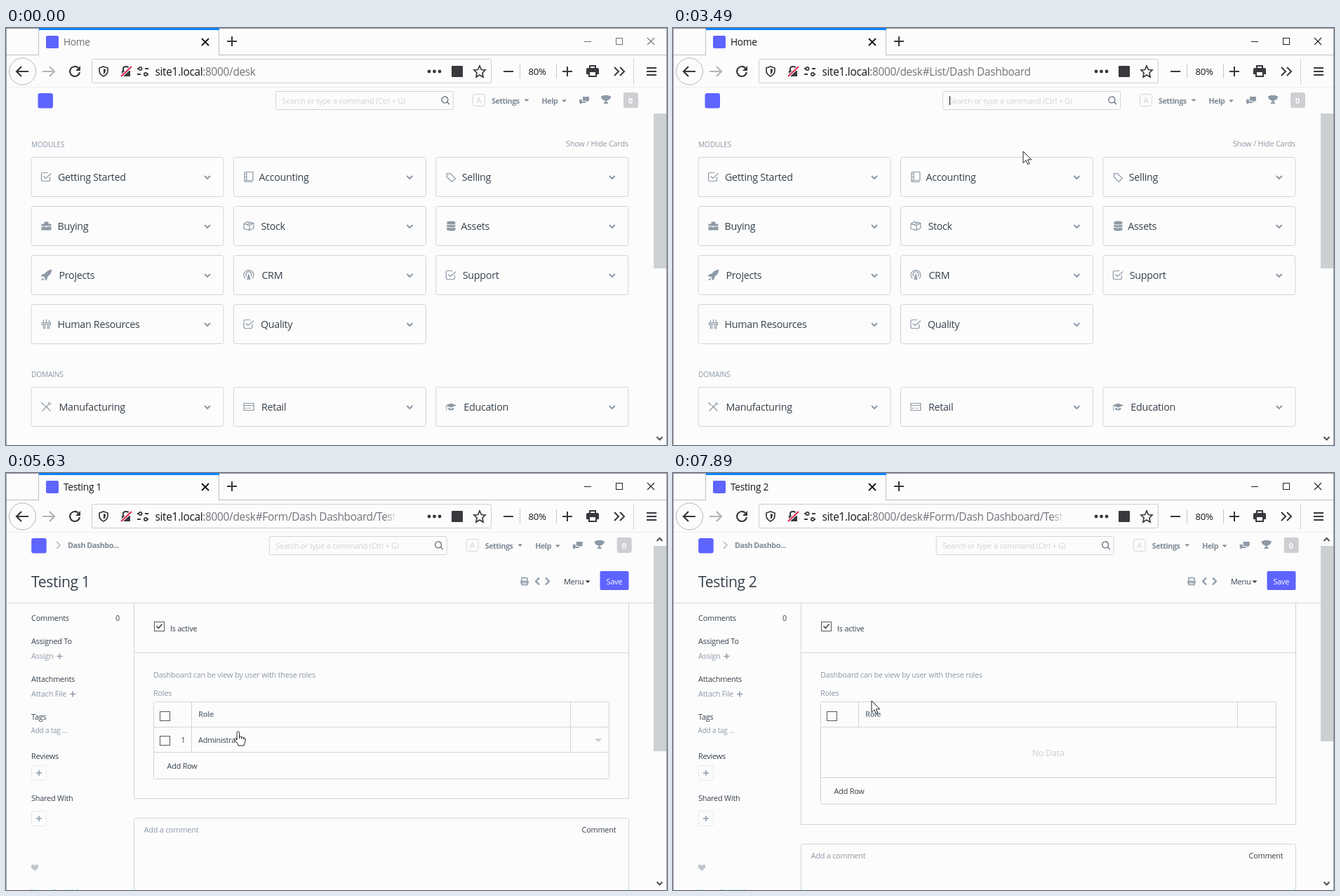
Write an HTML page that moves like this. It is 942x595 px and loops after 8 s.

```html
<!DOCTYPE html>
<html lang="en">
<head>
<meta charset="utf-8">
<title>Desk walkthrough</title>
<style>
html, body { margin: 0; width: 100%; height: 100%; overflow: hidden; background: #fcfcfc; }
svg { display: block; width: 942px; height: 595px; font-family: "Open Sans", "Noto Sans", sans-serif; }
text { white-space: pre; letter-spacing: -.02em; fill: #36414c; }
.m { fill: #8d99a6; }
.l { fill: #ccd2d8; }
.b, .mb { font-weight: 700; letter-spacing: -.04em; }
.mb { fill: #7f8b97; }
.w { fill: #fff; }
.k { fill: #15141a; }
.g { fill: #73737a; }
path, line, rect, circle { fill: none; }
.ln { stroke: #d1d5d9; }
.dim { opacity: .62; }
</style>
</head>
<body>
<svg id="stage" viewBox="0 0 942 595"></svg>
<script>
const INK = '#38383d', GREY = '#8d99a6', BLUE = '#5e64ff', PAGE = '#fcfcfc';
const ICONS = {
  check: 'M5 0V4Q5 6 3 6H-5Q-7 6-7 4V-4Q-7-6-5-6H2M-4-1L-1 2L7-5',
  book: 'M-4-7H6V5H-4Q-6 5-6 6T-4 7H6M-6 6V-5Q-6-7-4-7M-3-7V5M-5-4H-3M-5 0H-3',
  tag: 'M-6-5H-1L6 2L1 7L-6 0ZM-4-3H-3',
  box: 'M-7-3L-2-6L7-4V3L1 6L-7 4ZM-7-3L1-1L7-4M1-1V6M-3-2L4-5',
  tower: 'M0 0V7M-2 7L0-1L2 7M-5 5A7 7 0 1 1 5 5M-3 2A4 4 0 1 1 3 2',
  people: 'M-4-2V7M-2 7V0H2V7M4 7V-2M-6 2V-2H6V2M-4-6V-3M0-7V-2M4-6V-3',
  tools: 'M-6 6L5-5M6 6L-2-2M-7-6L-3-2M4-7V-4H7',
  card: 'M-7-5H7V5H-7ZM-7-2H7M-5 2H-2M0 2H3'
};
const SOLID = {
  bag: 'M-3-3V-6H3V-3H7V0H-7V-3H-1.5V-4.5H1.5V-3ZM-7 1H-1V2H1V1H7V6H-7Z',
  disks: 'M-6-6Q0-8 6-6V-3Q0-1-6-3ZM-6-2Q0 0 6-2V1Q0 3-6 1ZM-6 2Q0 4 6 2V6Q0 8-6 6Z',
  rocket: 'M8-8Q1-7-2-2L-6-1L-8 2L-4 2L-2 4V8L1 6L2 2Q7-1 8-8ZM-5 4L-8 8L-3 6Z',
  cap: 'M-8-2L0-5L8-2L0 1ZM-4 1L0 3L4 1V4Q0 6-4 4ZM-7-1V5H-6V-1Z',
  heart: 'M0 5L-5 0Q-6-4-3-4.500Q-1-4.500 0-2.500Q1-4.500 3-4.500Q6-4 5 0Z',
  chat: 'M-2-5H7V1H5V3L2 1H-2ZM-7-1H-3V2H2V4H-3L-6 6V4H-7Z',
  cup: 'M-4-6H4V-5H7Q7 0 3 1L1 2V4H3V6H-3V4H-1V2L-3 1Q-7 0-7-5H-4Z'
};

const tag = (x, y, body) => `<g transform="translate(${x} ${y})">${body}</g>`;
const text = (x, y, s, cls = '', size = 10.9, extra = '') =>
  `<text x="${x}" y="${y + size * .36}" font-size="${size}" class="${cls}" ${extra}>${s}</text>`;
const stroke = (x, y, d, color = GREY, w = 1.2) =>
  tag(x, y, `<path d="${d}" stroke="${color}" stroke-width="${w}"/>`);
const fill = (x, y, d, color = GREY) => tag(x, y, `<path d="${d}" style="fill:${color}"/>`);
const rect = (x, y, w, h, color, r = 0) =>
  `<rect x="${x}" y="${y}" width="${w}" height="${h}" rx="${r}" style="fill:${color}"/>`;
const frame = (x, y, w, h, r = 2, color = '#d1d5d9', extra = '') =>
  `<rect x="${x}" y="${y}" width="${w}" height="${h}" rx="${r}" stroke="${color}" ${extra}/>`;
const hline = (y, x1, x2, c = '#d1d5d9') => `<path d="M${x1} ${y}H${x2}" stroke="${c}"/>`;
const vline = (x, y1, y2, c = '#d1d5d9') => `<path d="M${x} ${y1}V${y2}" stroke="${c}"/>`;
const icon = (x, y, name) => SOLID[name] ? fill(x, y, SOLID[name]) : stroke(x, y, ICONS[name]);
const caret = (x, y, c = INK) => fill(x, y, 'M-3.500-1.500H3.500L0 2Z', c);
const plus = (x, y, r = 4, c = GREY, w = 1.5) => stroke(x, y, `M${-r} 0H${r}M0 ${-r}V${r}`, c, w);
const chevron = (x, y, up, c = '#505050') => stroke(x, y, up ? 'M-4 2L0-2L4 2' : 'M-4-2L0 2L4-2', c, 2);
const box = (x, y) => frame(x + .5, y + .5, 14, 13, 0, '#55595e');
const dashed = (x, y, s) => frame(x, y, s, s, 2, '#d1d8dd', 'stroke-dasharray="2 2"');
const group = (id, body) => `<g id="${id}">${body}</g>`;
const faint = body => `<g opacity=".55">${body}</g>`;
const lens = (x, y) => stroke(x, y, 'M3 2A4.500 4.500 0 1 0 2 3M2 2L6 6', '#6c7680', 1.4);

function chrome() {
  return rect(0, 0, 942, 85, '#fcfcfd') + hline(.5, 0, 942, '#8f9094') +
    hline(38.5, 0, 47, '#bfc0c4') + hline(38.5, 304, 942, '#bfc0c4') +
    vline(46.5, 1, 39, '#bfc0c4') + vline(303.5, 1, 39, '#bfc0c4') + rect(47, 0, 257, 3, '#0a84ff') +
    rect(57, 11, 18, 18, BLUE, 2) + stroke(284, 20, 'M-5-5L5 5M5-5L-5 5', '#15141a', 1.8) +
    plus(322, 19, 7, INK, 2) +
    group('focus', text(82, 20, 'Home', 'k', 13.7, 'id="title"') +
      stroke(829, 19, 'M-5 .5H5', '#222', 1) + frame(869.5, 14.5, 9, 9, 0, '#222') +
      stroke(919, 19, 'M-5-5L5 5M5-5L-5 5', '#222', 1.1)) +
    `<circle cx="23.500" cy="62" r="19" stroke="#b5b6ba"/>` +
    stroke(23, 62, 'M9 0H-8M-1-7L-8 0L-1 7', INK, 2.2) +
    stroke(61, 62, 'M-9 0H8M1-7L8 0L1 7', '#b4b4b8', 2.2) +
    stroke(98, 62, 'M5-5A7 7 0 1 0 7 1', INK, 2.2) + fill(98, 62, 'M8-8V-1H1Z', INK) +
    frame(122.5, 44.5, 569, 34, 2, '#cdced2') +
    stroke(139, 62, 'M0-7L6-5V-1Q6 4 0 7Q-6 4-6-1V-5Z', INK, 1.7) + fill(139, 62, 'M0-4V4Q3 2 3-1V-3Z', INK) +
    fill(171, 62, 'M-6-1H6V7H-6Z', INK) + stroke(171, 62, 'M-4 0V-4Q-4-7 0-7T4-4V0', INK, 2) +
    stroke(171, 62, 'M-7 7L8-7', '#fff', 4) + stroke(171, 62, 'M-7 7L8-7', '#e22850', 2) +
    stroke(195, 62, 'M-8-4H-6M0-4H0M3-4H8M-8 4H-3M6 4H8', INK, 2) +
    '<g stroke="#38383d" stroke-width="1.700"><circle cx="191.500" cy="58" r="2.200"/><circle cx="199" cy="66" r="2.200"/></g>' +
    [603, 610.5, 618].map(x => `<circle cx="${x}" cy="62" r="2.400" style="fill:${INK}"/>`).join('') +
    rect(635, 54, 16, 16, INK, 1) +
    stroke(675, 62, 'M0-8L2.500-2.500L8-2L4 2L5 8L0 5L-5 8L-4 2L-8-2L-2.500-2.500Z', INK, 1.7) +
    stroke(716, 62, 'M-7 0H7', INK, 2) + vline(732.5, 52, 72, '#c6c7cb') + text(744.5, 62, '80%', 'k', 13.2) +
    vline(784.5, 52, 72, '#c6c7cb') + plus(800, 62, 7, INK, 2) +
    fill(836, 62, 'M-5-9H5V-5H7Q9-5 9-3V4H6V8H-6V4H-9V-3Q-9-5-7-5H-5ZM-3-7V-5H3V-7ZM-4 1V6H4V1Z', INK) +
    stroke(874, 62, 'M-7-6L-1 0L-7 6M1-6L7 0L1 6', INK, 2) + vline(894.5, 43, 81, '#d5d5d9') +
    stroke(920, 62, 'M-7-5H7M-7 0H7M-7 5H7', INK, 2) + hline(84.5, 0, 942, '#eeeff1') +
    '<g mask="url(#fade)">' + text(212.5, 62.5, '<tspan class="k">site1.local</tspan><tspan class="g" id="path"></tspan>', '', 15.4) + '</g>';
}

function header() {
  return rect(45.5, 93, 21.5, 21.5, BLUE, 3) + frame(384.5, 90.5, 253, 26, 2) +
    text(393.5, 104, 'Search or type a command (Ctrl + G)', 'l', 10.9, 'id="hint"') +
    text(393.5, 104, '', '', 10.9, 'id="query"') + lens(626, 103) +
    `<path id="caret" d="M0 97V110" stroke="#111"/>` +
    frame(665.5, 94.5, 17, 17, 3) + text(670.5, 103.5, 'A', 'l', 10.9) +
    text(692, 104, 'Settings', 'mb', 10.7) + caret(742, 103, '#7f8b97') +
    text(763.5, 104, 'Help', 'mb', 10.7) + caret(795.5, 104, '#7f8b97') +
    icon(824, 103, 'chat') + icon(855, 102, 'cup') +
    rect(880, 92, 21, 22, '#cdcfd2', 3) + text(887, 104, '0', 'w b', 10.9);
}

const scrollbar = (y1, y2) => rect(923, y1, 18, y2 - y1, '#cdd0d3') + chevron(931.5, 585.5) +
  (y1 < 120 ? chevron(931.5, 95, true) : '');

function home() {
  const cards = [
    ['Getting Started', 'check', 38], ['Accounting', 'book', 36], ['Selling', 'tag', 37],
    ['Buying', 'bag', 37.5], ['Stock', 'box', 39], ['Assets', 'disks', 35.5],
    ['Projects', 'rocket', 39.5], ['CRM', 'tower', 40], ['Support', 'check', 38],
    ['Human Resources', 'people', 37.5], ['Quality', 'check', 38.5], null,
    ['Manufacturing', 'tools', 39.5], ['Retail', 'card', 39.5], ['Education', 'cap', 39.5]
  ];
  return text(36, 166, 'MODULES', 'm', 10.2) + text(36, 494, 'DOMAINS', 'm', 10.2) +
    text(798, 165, 'Show / Hide Cards', 'm') + scrollbar(122, 343) +
    cards.map((c, i) => {
      if (!c) return '';
      const x = 36 + (i % 3) * 288.4, row = i / 3 | 0, y = row < 4 ? 184.5 + row * 70 : 512.5;
      return frame(x, y, 274, 56, 3) + icon(x + 21.5, y + 28, c[1]) +
        text(x + c[2], y + 28.5, c[0], '', 14.3) + chevron(x + 251, y + 28.5, false, GREY);
    }).join('');
}

const button = s => rect(846.5, 140, 41, 27, BLUE, 2) + text(855.5, 155, s, 'w');
const pageHead = title => text(36, 155, title, '', 21.2) + hline(185.5, 1, 923);

function list() {
  const side = [['Reports', 215, 80], ['Calendar', 260.5, 86], ['Kanban', 284.5, 79.5],
    ['Assigned To', 345.5, 99], ['Created By', 369, 93], ['Tags', 452.5, 61.5]];
  const mark = y => box(196, y - 7) + faint(icon(223, y, 'heart'));
  const row = (name, y) => mark(y - 1) + text(236, y, name, 'b', 10.9) +
    text(530, y + 2, name, 'm') + text(722, y, name, 'm') + text(790, y, '5 d', 'm') + dashed(812.5, y - 11.5, 21) +
    faint(icon(848, y, 'chat') + text(859, y, '0', 'm'));
  return pageHead('Dash Dashboard') + text(737, 155, 'Menu') + caret(771.5, 155) + text(797, 155, 'Refresh') + button('New') +
    side.map(([s, y, x]) => text(36, y, s) + caret(x, y + 1)).join('') +
    text(36, 238, 'List', 'm') + text(36, 323, 'FILTER BY', 'm', 9) + text(36, 391.5, 'Add Fields', 'm') + plus(95, 391.5) +
    text(36, 430, 'TAGS', 'm', 9) + text(36, 477, 'Show tags', 'm') + text(36, 518, 'SAVE FILTER', 'm', 9) +
    frame(36, 528.5, 132, 22.5, 3) + text(45, 540.5, 'Filter Name', 'l') +
    vline(182.5, 185, 567) + vline(887.5, 185, 567) +
    [230.5, 268.5, 521.5, 567.5].map(y => hline(y, 182, 888)).join('') +
    frame(197, 194, 100.5, 26.5, 2) + text(206, 208, 'ID', 'l') + lens(286, 208) +
    text(197, 250.5, 'Add Filter', 'm') + text(767, 250.5, 'Last Modified On', 'm') +
    fill(868, 250, 'M-1.500-4H1.500V0H5L0 5L-5 0H-1.500Z') +
    group('rows', [305.5, 342.5, 378.5].map(y => hline(y, 182, 888)).join('') +
      mark(287) + text(236, 287.5, 'Name', 'm') + text(530, 287.5, 'Name', 'm') +
      text(845.5, 287.5, '2 of 2', 'm') + row('Testing 2', 324) + row('Testing 1', 361) +
      rect(196.5, 531, 30, 27, GREY, 2) + text(206, 545, '20', 'w') + text(236.5, 545, '100') + text(272.5, 545, '500')) +
    scrollbar(104, 551);
}

function form(n) {
  const d = n === 2 ? 37 : 0, low = 399 + (d ? 36 : 0);
  return pageHead('Testing ' + n) + stroke(74, 103, 'M-2-5L3 0L-2 5', '#b4bcc4', 1.6) +
    text(88, 103.5, 'Dash Dashbo...', 'mb', 10.7) +
    stroke(739, 154.5, 'M-4-1V-5H3L4-4V-1M-5 3V0H5V3M-4 2H4V5H-4Z', GREY, 1.5) +
    stroke(757, 154.5, 'M3-5L-2 0L3 5M12-5L17 0L12 5', GREY, 2.2) +
    text(795, 155, 'Menu') + caret(829, 155) + button('Save') +
    [['Comments', 207], ['Assigned To', 240], ['Attachments', 294.5], ['Tags', 348.5], ['Reviews', 404.5], ['Shared With', 464.5]]
      .map(([s, y]) => text(36, y, s)).join('') +
    text(156, 207.5, '0') + text(36, 261.5, 'Assign', 'm') + plus(76.5, 261.5) +
    text(36, 315.5, 'Attach File', 'm') + plus(95, 315.5) + text(35.5, 367, 'Add a tag ...', 'm', 10) +
    [428, 493].map(y => dashed(36.5, y - 10.5, 21) + plus(47, y)).join('') +
    faint(icon(41, 563, 'heart')) + text(36, 598, 'You edited this', 'm') +
    vline(182.5, 185, 464.5 + d) + vline(887.5, 185, 464.5 + d) + hline(256.5, 182, 888) + hline(464.5 + d, 182, 888) +
    box(211, 212) + stroke(218.5, 218.5, 'M-4 0L-1 3L4-3', INK, 1.5) + text(234, 222, 'Is active') +
    text(210, 288.5, 'Dashboard can be view by user with these roles', 'm') + text(210, 314.5, 'Roles', 'm') +
    frame(210.5, 326.5, 649, low + 38 - 327, 2) + hline(362.5, 210, 860) + hline(low - .5, 210, 860) +
    vline(264.5, 326, d ? 363 : 399) + vline(804.5, 326, d ? 363 : 399) +
    box(219, 340) + text(274, 344.5, 'Role', 'mb') + text(229.5, low + 19.5, 'Add Row') +
    (d ? text(511.5, 399.5, 'No Data', 'l', 12.6)
      : box(219, 375) + text(249.5, 381, '1') + text(274, 381, 'Administrator') + fill(844, 381, 'M-5-2H5L0 3Z', '#c5cbd1')) +
    `<path class="ln" d="M182.500 595V${494.5 + d}Q182.500 ${492.5 + d} 184.500 ${492.5 + d}H885.500Q887.500 ${492.5 + d} 887.500 ${494.5 + d}V595"/>` +
    text(196.5, 509.5 + d, 'Add a comment', 'm') + text(820.5, 509.5 + d, 'Comment') +
    scrollbar(104, d ? 383 : 397);
}

function menu() {
  return rect(387, 280, 249, 20.5, '#c9ced2', 4) + rect(384.5, 117, 253.5, 181, PAGE) +
    frame(384.5, 117, 253, 181, 2) + group('hover', rect(385, 156, 235, 37, '#f0f4f7')) +
    rect(620, 136, 17, 136, '#cdd0d3') + chevron(628, 127, true) + chevron(628, 288) +
    [0, 1, 2, 3, 4].map(i => text(395.5, 137 + i * 37.3, '', '', 10.9, `id="opt${i}"`)).join('');
}

const cursors =
  group('arrow', '<path d="M0 0V16.500L4 12.800L6.600 18.600L9 17.500L6.400 11.900H11.800Z" style="fill:#fff" stroke="#222"/>') +
  group('beam', '<path d="M-3-5H-1L0-4L1-5H3M0-4V4M-3 5H-1L0 4L1 5H3" stroke="#222"/>') +
  group('hand', '<path d="M-2 1.500A1.700 1.700 0 0 1 1.500 1.500V7Q4 6 4.500 8Q7 7 7.500 9Q10 8 10 11V13C10 16 8.500 17 8 20H0C0 17-3 15-5.500 11.500C-6 10-4.500 9-3.500 10L-2 12ZM1.500 7V10M4.500 8V10.500M7.500 9V11" style="fill:#fff" stroke="#222"/>');

document.getElementById('stage').innerHTML =
  `<defs><linearGradient id="edge" gradientUnits="userSpaceOnUse" x1="540" x2="557"><stop stop-color="#fff"/><stop offset="1" stop-color="#000"/></linearGradient>
  <mask id="fade" maskUnits="userSpaceOnUse" x="200" y="40" width="400" height="44"><rect x="200" y="40" width="400" height="44" style="fill:url(#edge)"/></mask></defs>` +
  rect(0, 0, 942, 595, PAGE) + chrome() +
  group('home', home()) + group('list', list()) + group('form1', form(1)) + group('form2', form(2)) +
  group('header', header()) + group('menu', menu()) +
  vline(.5, 0, 595, '#a3a4a8') + vline(941.5, 0, 595, '#a3a4a8') + group('pointer', cursors);

const $ = id => document.getElementById(id);
const show = (id, on) => { $(id).style.display = on ? '' : 'none'; };
const LOOP = 8000, STEP = 125, TYPED = 'dash dash', DOC = 'Dash Dashboard';

// time, x, y, shape
const MOVES = [
  [250, 560, 575, 'arrow'], [875, 454, 100, 'beam'], [2875, 454, 100, 'beam'], [3125, 499, 176, 'arrow'],
  [3625, 499, 176, 'arrow'], [4250, 295, 354, 'hand'], [5000, 295, 354, 'hand'], [5500, 331, 369, 'hand'],
  [5750, 331, 369, 'hand'], [6000, 338, 340, 'hand'], [6375, 368, 293, 'hand'], [7000, 368, 293, 'hand'],
  [7375, 283, 325, 'hand'], [7625, 283, 325, 'arrow'], [8000, 283, 325, 'arrow']
];
// time, page, tab title, address path
const VIEWS = [
  [0, 'home', 'Home', ''], [3375, 'home', 'Home', '#List/' + DOC], [3750, 'list', DOC, `#List/${DOC}/List`],
  [5125, 'list', DOC, `#Form/${DOC}/Testing 1`], [5375, 'form1', 'Testing 1', `#Form/${DOC}/Testing 1`],
  [7000, 'list', DOC, `#List/${DOC}/List`], [7500, 'form2', 'Testing 2', `#Form/${DOC}/Testing 2`]
];

function point(t) {
  show('pointer', t >= MOVES[0][0]);
  if (t < MOVES[0][0]) return;
  const i = MOVES.findLastIndex(m => m[0] <= t), a = MOVES[i], b = MOVES[i + 1] || a;
  const u = b === a ? 0 : (t - a[0]) / (b[0] - a[0]), e = u * u * (3 - 2 * u);
  $('pointer').setAttribute('transform', `translate(${a[1] + (b[1] - a[1]) * e} ${a[2] + (b[2] - a[2]) * e})`);
  for (const s of ['arrow', 'beam', 'hand']) show(s, s === a[3]);
}

function search(t) {
  const open = t >= 1125 && t < 3250;
  const count = open ? Math.max(0, Math.min(9, Math.floor((t - 1250) / STEP) + 1)) : 0;
  const found = t >= 2375 ? 9 : Math.max(0, count - 1);
  const word = TYPED.slice(0, found);
  $('query').textContent = TYPED.slice(0, count);
  show('hint', !count);
  show('caret', t >= 1000 && t < 3750 && (t < 2500 || t % 1000 < 625));
  $('caret').setAttribute('transform', `translate(${394.5 + (count ? $('query').getComputedTextLength() : 0)} 0)`);
  show('menu', open && found);
  show('hover', t >= 3000);
  if (!open || !found) return;
  const bold = s => `<tspan class="b">${s}</tspan>`, name = bold(DOC.slice(0, found)) + DOC.slice(found);
  [`Search for '${bold(word)}'`, name + ' List', name + ' Report', 'New ' + name, 'Help on Search']
    .forEach((s, i) => { $('opt' + i).innerHTML = s; });
}

function render(ms) {
  const t = Math.floor((ms + 15) / STEP) * STEP % LOOP;
  const [, page, title, path] = VIEWS.findLast(v => v[0] <= t);
  for (const p of ['home', 'list', 'form1', 'form2']) show(p, p === page);
  show('rows', t >= 4000);
  $('title').textContent = title;
  $('path').textContent = ':8000/desk' + path;
  $('focus').setAttribute('class', t < 1000 ? 'dim' : '');
  $('header').setAttribute('transform', `translate(${page === 'home' ? 0 : -9.3} 0)`);
  search(t);
  point(t);
}

const start = performance.now();
function tick() {
  render((performance.now() - start) % LOOP);
  requestAnimationFrame(tick);
}
tick();
</script>
</body>
</html>
```
